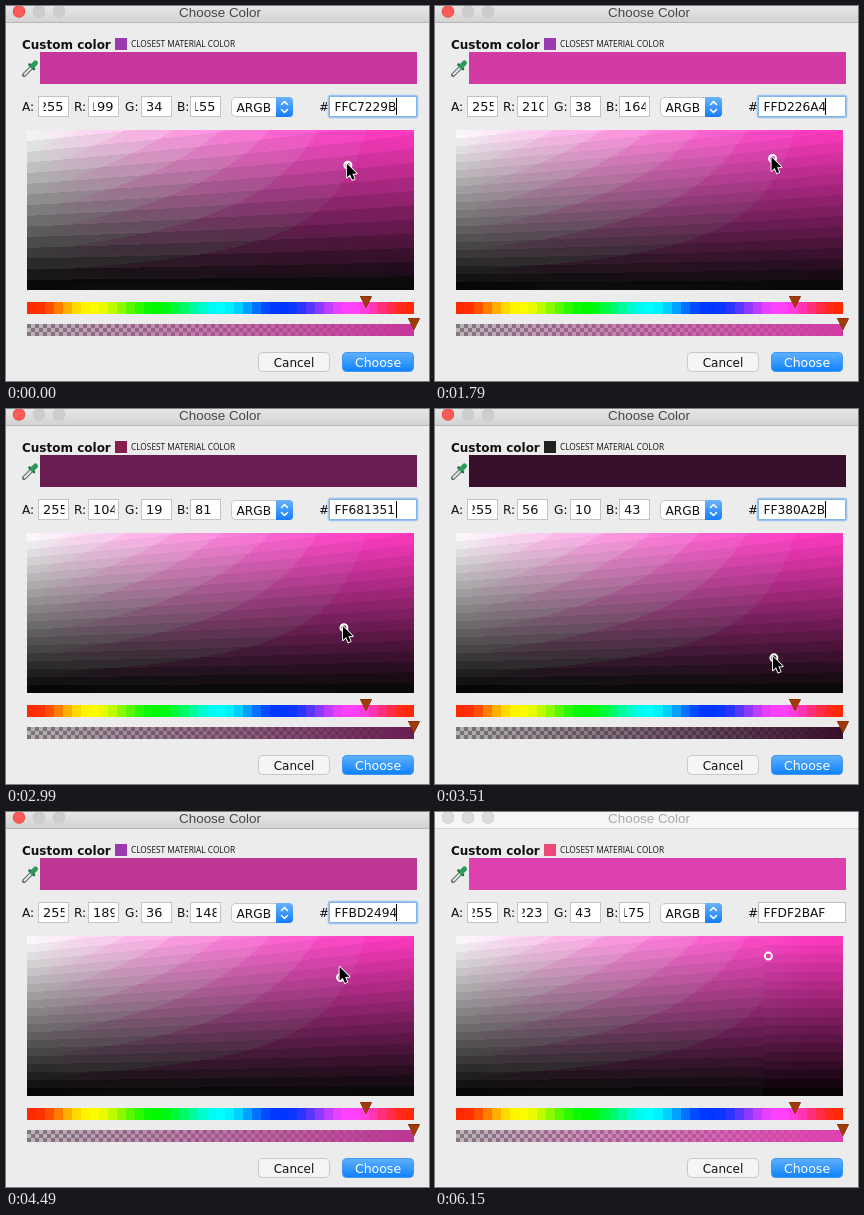
Animation, 423 px wide and 375 px high, one loop 6.19 s. Source, as an HTML page with a canvas:

```html
<!DOCTYPE html>
<html lang="en">
<head>
<meta charset="utf-8">
<title>Choose Color</title>
<style>
html, body { margin: 0; width: 100%; height: 100%; overflow: hidden; background: #ececec; }
canvas { display: block; }
</style>
</head>
<body>
<canvas id="stage" width="423" height="375"></canvas>
<script>
const ctx = document.getElementById('stage').getContext('2d');
const LOOP = 6190, TICK = 58, LEAD = 90, BLUR = 6150;
const BOX = { x: 21, y: 124, w: 387, h: 160 };
const SANS = '"DejaVu Sans", "Open Sans", sans-serif';
const TEXT = '12.2px ' + SANS;

const parse = hex => [0, 2, 4].map(i => parseInt(hex.slice(i, i + 2), 16));

// The picked colour while dragging; equal neighbours are pauses
const COLORS = [
  [113, 'C7229B'], [800, 'EC2BB9'], [1450, 'EC2BB9'], [2470, '8F1A70'],
  [3510, '380A2B'], [3630, '380A2B'], [4170, '8E1A6F'], [4670, 'DF2BAF']
].map(([t, hex]) => [t, ...parse(hex)]);

// The pointer's way out of the window: time, x, y
const EXIT = [[4913, 331, 142], [5150, 346, 331], [5620, 370, 388]];

const MATERIAL = ['9C27B0', 'FF4081', '880E4F', '212121', 'AD1457', 'EC407A'].map(parse);

const between = (t, a, b) => t >= a && t < b;

// The dialog repaints in ticks counted from the latest key
function snap(time) {
  const from = [...COLORS, ...EXIT].map(k => k[0]).filter(t => t <= time).pop() || 0;
  return from + Math.floor((time - from) / TICK) * TICK;
}

function track(keys, t) {
  const i = keys.findIndex(k => k[0] > t);
  if (i === 0) return keys[0].slice(1);
  if (i < 0) return keys[keys.length - 1].slice(1);
  const a = keys[i - 1], b = keys[i], p = (t - a[0]) / (b[0] - a[0]);
  return a.slice(1).map((v, j) => v + (b[j + 1] - v) * p);
}

const colorAt = t => track(COLORS, t);

function markerAt(t) {
  const [r, g] = colorAt(t);
  return [BOX.x + BOX.w * (1 - g / r), BOX.y + BOX.h * (1 - r / 255)];
}

function pointerAt(t) {
  if (t >= EXIT[0][0]) return track(EXIT, t);
  const [x, y] = markerAt(t);
  return [x - 1.5, Math.min(y, markerAt(t + LEAD)[1]) - 2];
}

// Colour as the wide display shows it; values 0..1 in, 0..255 out
function display(...rgb) {
  const [r, g, b] = rgb.map(v => Math.min(1, Math.max(0, v)));
  const green = .948 * g ** 2.2 + .019 * r ** 2.2 + .033 * b ** 2.2;
  return [r, green ** (1 / 2.2), b].map(v => Math.round(v * 255));
}
const css = rgb => `rgb(${display(...rgb.map(v => v / 255))})`;

const band = (v, n) => Math.min(1, (Math.floor(v * n) + .5) / n);

// Brightness falls in bands that tilt by slope; mix sets how far green is stepped too
function makeField(levels, slope, mix, tint) {
  const c = document.createElement('canvas');
  c.width = BOX.w;
  c.height = BOX.h;
  const paint = c.getContext('2d'), img = paint.createImageData(BOX.w, BOX.h);
  for (let y = 0, i = 0; y < BOX.h; y++) {
    for (let x = 0; x < BOX.w; x++, i += 4) {
      const s = x / BOX.w, v = 1 - y / BOX.h;
      let r = v, g = v * (1 - s);
      const w = (1 - slope) * r + slope * g, shift = band(w, levels) - w;
      g += (band(g, 8) - g) * mix * Math.min(1, s * 4) + shift * (1 - s);
      r = Math.max(r + shift, g) - tint * v * (1 - s) ** 3;
      img.data.set([...display(r, g, r - .264 * (r - g)), 255], i);
    }
  }
  paint.putImageData(img, 0, 0);
  return c;
}
const FIELD = {
  tinted: makeField(15, .25, .6, .03),
  banded: makeField(20, .25, .6, 0),
  flat: makeField(18, 0, 0, 0)
};

function rect(x, y, w, h, fill) {
  ctx.fillStyle = fill;
  ctx.fillRect(x, y, w, h);
}

function text(str, x, y, font = TEXT, fill = '#111', align = 'left') {
  ctx.font = font;
  ctx.fillStyle = fill;
  ctx.textAlign = align;
  ctx.fillText(str, x, y);
}

function path(points) {
  ctx.beginPath();
  points.forEach(([x, y]) => ctx.lineTo(x, y));
}

function line(points, color, width) {
  path(points);
  ctx.strokeStyle = color;
  ctx.lineWidth = width;
  ctx.lineCap = ctx.lineJoin = 'round';
  ctx.stroke();
}

function shape(points, fill, stroke, width = 1) {
  line([...points, points[0]], stroke, width);
  ctx.fillStyle = fill;
  ctx.fill();
}

function circle(x, y, r, fill) {
  ctx.beginPath();
  ctx.arc(x, y, r, 0, 7);
  ctx.fillStyle = fill;
  ctx.fill();
}

function vertical(y0, y1, top, bottom) {
  const g = ctx.createLinearGradient(0, y0, 0, y1);
  g.addColorStop(0, top);
  g.addColorStop(1, bottom);
  return g;
}

function rounded(x, y, w, h, r, fill, stroke) {
  ctx.beginPath();
  ctx.roundRect(x, y, w, h, r);
  ctx.fillStyle = fill;
  ctx.fill();
  if (!stroke) return;
  ctx.lineWidth = 1;
  ctx.strokeStyle = stroke;
  ctx.stroke();
}

function titleBar(active) {
  rect(0, 0, 423, 16, active ? vertical(0, 16, '#e6e6e6', '#d3d3d3') : '#f6f6f6');
  rect(0, 16, 423, 1, active ? '#b6b6b6' : '#d5d5d5');
  for (let i = 0; i < 3; i++) {
    const x = 13 + i * 20, red = active && i === 0;
    circle(x, 5.5, 6.2, red ? '#e0443e' : '#c6c6c6');
    circle(x, 5.5, 5.6, red ? '#fc5b57' : active ? '#cdcdcd' : '#dcdcdc');
  }
  text('Choose Color', 214, 11, '13.4px "Liberation Sans", Arial, sans-serif',
    active ? '#464646' : '#a9a9a9', 'center');
}

function dropper() {
  line([[18, 69], [26, 61]], '#5d6a66', 4);
  line([[18.5, 68.5], [25.5, 61.5]], '#e4efea', 2);
  line([[23.5, 58.5], [28, 63]], '#1f6b40', 2.5);
  line([[26.5, 60], [29.5, 57]], '#2c9a58', 5);
}

// Three digits do not fit: at rest the box is scrolled to its end
function numberBox(label, lx, x, value, atEnd) {
  text(label, lx, 105);
  rect(x, 90, 31, 21, '#c4c4c4');
  rect(x + 1, 91, 29, 19, '#fff');
  const str = String(Math.round(value)), font = '12.9px ' + SANS;
  ctx.save();
  ctx.beginPath();
  ctx.rect(x + 5.5, 91, 21, 19);
  ctx.clip();
  if (str.length > 2 && atEnd) text(str, x + 25.5, 105, font, '#111', 'right');
  else text(str, x + 5, 105, font);
  ctx.restore();
}

function hexBox(hex, focus, caret) {
  text('#', 313, 105);
  if (focus) {
    rounded(321.5, 88.5, 91, 24, 3, '#b9d3f0');
    rounded(322.5, 89.5, 89, 22, 2, '#84b3ea');
  } else {
    rect(323, 90, 88, 21, '#bcbcbc');
  }
  rect(324, 91, 86, 19, '#fff');
  text(hex, 328.5, 105);
  if (caret) rect(390, 92, 1, 17, '#000');
}

function popup() {
  rounded(225.5, 91.5, 61, 19, 4, '#fff', '#c6c6c6');
  rounded(270, 91, 17, 20, [0, 4, 4, 0], vertical(91, 111, '#6bb3fa', '#147cfb'));
  for (const d of [-1, 1]) {
    const y = 101 + d * 2.5;
    line([[275.5, y], [278.5, y + d * 3], [281.5, y]], '#fff', 1.5);
  }
  text('ARGB', 230.5, 106);
}

function handle(x, y) {
  shape([[x - 5.5, y], [x + 5.5, y], [x, y + 11]], '#a03a08', '#7c2c04');
}

function hueBar() {
  const n = 43, edge = i => Math.round(BOX.x + i * BOX.w / n);
  for (let i = 0; i < n; i++) {
    const hue = (i + .5) / n * 6;
    const rgb = [5, 3, 1].map(k => {
      const p = (k + hue) % 6, v = 1 - Math.max(0, Math.min(p, 4 - p, 1));
      return 255 * v * v * (3 - 2 * v);
    });
    rect(edge(i), 296, edge(i + 1) - edge(i), 12, css(rgb));
  }
  handle(360, 290.5);
}

function alphaBar(rgb) {
  ctx.save();
  ctx.beginPath();
  ctx.rect(BOX.x, 318, BOX.w, 12);
  ctx.clip();
  rect(BOX.x, 318, BOX.w, 12, '#bcbcbc');
  for (let i = 0; i * 4 < BOX.w; i++) {
    for (let j = i % 2; j < 3; j += 2) rect(BOX.x + i * 4, 318 + j * 4, 4, 4, '#7c7c7c');
  }
  ctx.restore();
  const c = display(...rgb.map(v => v / 255));
  const g = ctx.createLinearGradient(BOX.x, 0, BOX.x + BOX.w, 0);
  g.addColorStop(0, `rgba(${c},0.06)`);
  g.addColorStop(1, `rgba(${c},1)`);
  rect(BOX.x, 318, BOX.w, 12, g);
}

function buttons() {
  rounded(252.5, 346.5, 71, 19, 4, '#f5f5f5', '#c8c8c8');
  rounded(336.5, 346.5, 71, 19, 4, vertical(346, 366, '#62b2fb', '#0b80fc'), '#3f97f5');
  text('Cancel', 288, 361, '12px ' + SANS, '#111', 'center');
  text('Choose', 372, 361, '12.5px ' + SANS, '#fff', 'center');
}

function tooltip() {
  const outline = [[330.5, 279.5], [430, 279.5], [430, 302.5], [420, 302.5], [408, 312], [391, 302.5], [330.5, 302.5]];
  shape(outline, '#fbfbdc', '#6f6f64');
  text('Opacity: 255', 335.5, 296, 'bold 12px ' + SANS);
}

function arrow(x, y) {
  const pts = [[0, 0], [0, 15], [3.4, 11.8], [5.8, 17.4], [8.3, 16.3], [5.9, 10.9], [10.6, 10.7]];
  shape(pts.map(p => [p[0] * .93 + x + .5, p[1] * .93 + y + .5]), '#000', '#fff', 1.8);
}

function nearest(rgb) {
  const dist = c => Math.hypot(...c.map((v, i) => v - rgb[i]));
  return MATERIAL.reduce((a, b) => dist(b) < dist(a) ? b : a);
}

function draw(time) {
  const t = snap(time);
  const rgb = colorAt(t).map(Math.round);
  const soon = colorAt(t + LEAD);
  const resting = String(colorAt(t)) === String(soon);
  const active = time < BLUR, hovered = time >= 5080;

  rect(0, 0, 423, 375, '#ececec');
  titleBar(active);

  text('Custom color', 16, 43, 'bold 12px ' + SANS);
  rect(109, 32, 12, 12, css(nearest(soon)));
  text('CLOSEST MATERIAL COLOR', 125, 41, '8.3px "Open Sans", sans-serif');
  dropper();
  rect(34, 46, 377, 32, css(rgb));

  numberBox('A:', 16, 32, 255, resting);
  numberBox('R:', 68, 82, rgb[0], resting);
  numberBox('G:', 119, 135, rgb[1], resting);
  numberBox('B:', 171, 184, rgb[2], resting);
  popup();
  const hex = 'FF' + rgb.map(v => v.toString(16).padStart(2, '0')).join('').toUpperCase();
  hexBox(hex, active, active && !between(time, 5080, 5620));

  ctx.drawImage(time < 170 ? FIELD.tinted : FIELD.banded, BOX.x, BOX.y);
  if (hovered) {
    const sx = 328 - BOX.x, w = BOX.w - sx;
    ctx.drawImage(FIELD.flat, sx, 0, w, BOX.h, 328, BOX.y, w, BOX.h);
  }
  ctx.beginPath();
  ctx.arc(...markerAt(t), 3.5, 0, 7);
  ctx.lineWidth = 2;
  ctx.strokeStyle = '#fff';
  ctx.stroke();

  hueBar();
  alphaBar(rgb);
  buttons();
  if (between(time, 5080, 5380)) tooltip();
  handle(408, 312.5);
  if (time < 5620) arrow(...pointerAt(t));
}

const start = performance.now();
function frame() {
  draw((performance.now() - start) % LOOP);
  requestAnimationFrame(frame);
}
frame();
</script>
</body>
</html>
```
